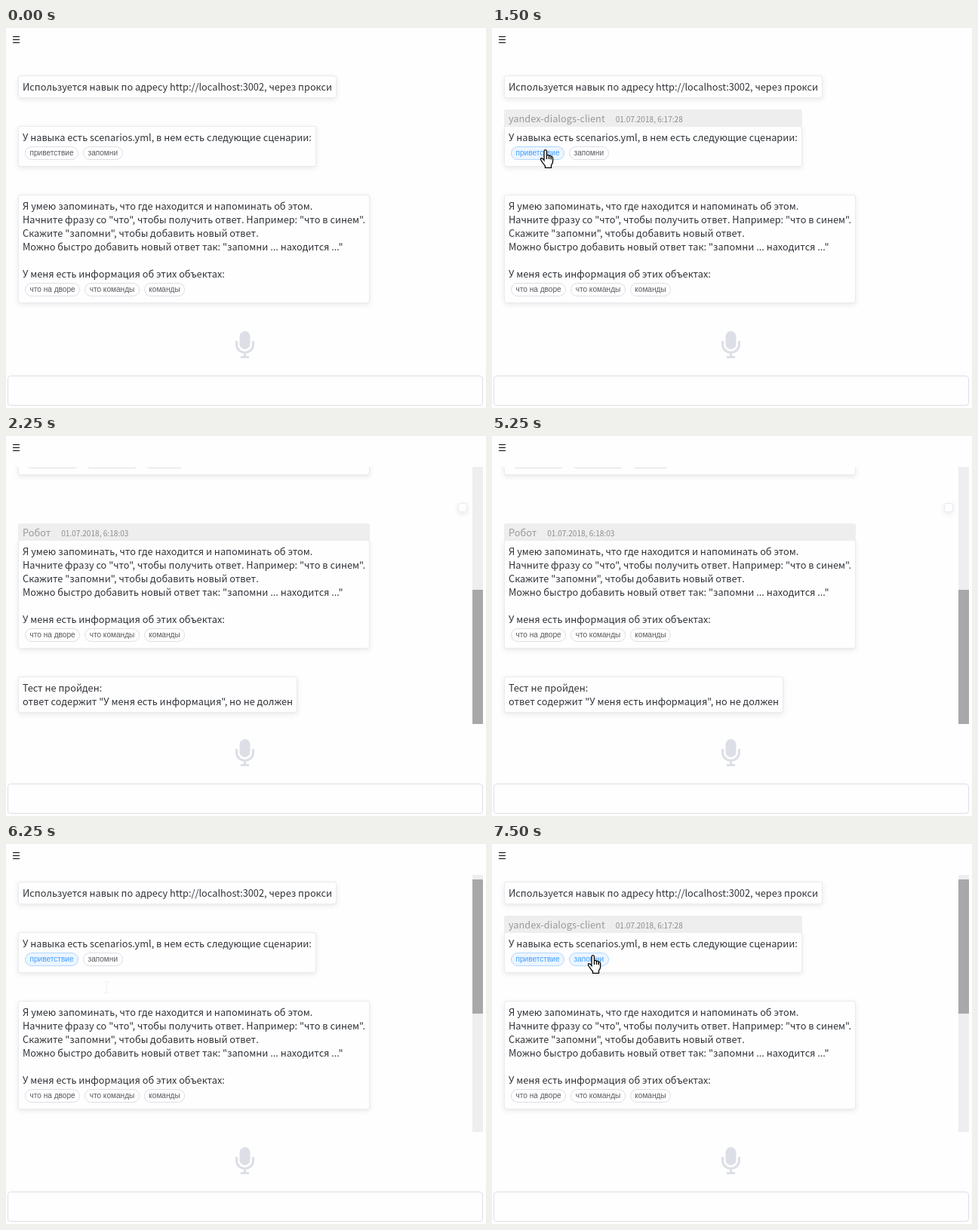
Write an HTML page that moves like this. It is 636 by 504 pixels and loops after 8 s.

```html
<!DOCTYPE html>
<html lang="ru">
<head>
<meta charset="utf-8">
<style>
html, body { margin: 0; width: 100%; height: 100%; overflow: hidden; background: #fefefe; }
body { position: relative; font: 12.75px/18px "Noto Sans CJK JP", "Noto Sans CJK SC", "Noto Sans", sans-serif; color: #2f3338; }
* { box-sizing: border-box; }
[hidden] { display: none !important; }
#view { position: absolute; left: 0; top: 41px; width: 636px; height: 341px; overflow: hidden; }
#list { position: absolute; left: 0; top: -41px; width: 100%; }
.msg { position: absolute; left: 16px; padding: 5px; background: #fefefe; border: 1px solid #e8ebf1; border-radius: 3px; box-shadow: 0 2px 7px rgba(0,0,0,.09); }
.msg.own { left: auto; right: 25px; }
.line { height: 18px; white-space: pre; }
.head { position: absolute; left: -1px; right: -1px; top: -23px; height: 23px; padding: 3px 6px; display: flex; gap: 14px; background: #eee; color: #999; border-radius: 3px 3px 0 0; white-space: nowrap; }
.date { font-size: 10.1px; line-height: 20px; color: #8c8c8c; }
.tags { display: flex; gap: 6px; height: 24px; padding: 3px; }
.tag { height: 18px; padding: 0 5.5px; border: 1px solid #dcdfe6; border-radius: 9px; color: #585a5e; font: 10.1px/16px "Liberation Sans", Arial, sans-serif; white-space: nowrap; }
.tag.on { color: #409eff; background: #ecf5ff; border-color: #b3d8ff; }
#track { position: absolute; left: 618px; top: 0; width: 14px; height: 341px; background: #eee; }
#thumb { position: absolute; left: 0; width: 14px; background: #a8a8a8; }
#menu { position: absolute; left: 9px; top: 11px; }
#mic { position: absolute; left: 303px; top: 401px; }
#input { position: absolute; left: 2px; top: 461px; width: 630px; height: 40px; border: 1px solid #dcdfe6; border-radius: 4px; background: #fefefe; }
.cur { position: absolute; left: 0; top: 0; overflow: visible; }
</style>
</head>
<body>
<svg id="menu" width="9" height="9" fill="#000"><path d="M0 0h9v1H0zM0 4h9v1H0zM0 8h9v1H0z"/></svg>
<div id="view"><div id="list"></div><div id="track"><div id="thumb"></div></div></div>
<svg id="mic" width="27" height="38" fill="none" stroke="#dcdfe6">
  <rect x="6.5" y="1" width="14" height="24" rx="7" fill="#dcdfe6" stroke="none"/>
  <path d="M2.5 14v5a11 10.5 0 0 0 22 0v-5M13.5 29v6M8 35.500h11" stroke-width="3"/>
</svg>
<div id="input"></div>
<svg class="cur" id="arrow" width="13" height="20"><path d="M.5 .5V16.5L4.3 13 7 19 9.5 18 6.8 12H12Z" fill="#fff" stroke="#000"/></svg>
<svg class="cur" id="hand" width="18" height="26" fill="#fff" stroke="#000" stroke-width="1.3">
  <path d="M5 2.5Q5 .6 6.7 .6T8.5 2.5V8.5Q8.6 7.3 10 7.4T11.5 9Q11.7 8 13 8.2T14.3 10Q14.8 9.2 15.7 9.5T16.6 11.5V16.5Q16.5 18 14.5 21V24.4H6.5V22Q3 18 1 14.5Q-.2 12.3 1.2 11.7T5 14.5Z"/>
  <path d="M8.5 8v5M11.5 9v4M14.3 10v3.5" fill="none"/>
</svg>
<svg class="cur" id="beam" width="7" height="16"><path d="M0 .5H3M4 .5H7M3.5 1V15M0 15.5H3M4 15.5H7" stroke="#000" stroke-opacity=".05"/></svg>
<script>
const $ = id => document.getElementById(id);
const LOOP = 8000, TOP = 41, VIEW = 341;
const FIRST = 63, GAP = 37, END = 15, LINE = 18, TAGS = 24, PAD = 12;

const help = {
  lines: [
    'Я умею запоминать, что где находится и напоминать об этом.',
    'Начните фразу со "что", чтобы получить ответ. Например: "что в синем".',
    'Скажите "запомни", чтобы добавить новый ответ.',
    'Можно быстро добавить новый ответ так: "запомни ... находится ..."',
    '',
    'У меня есть информация об этих объектах:'
  ],
  tags: ['что на дворе', 'что команды', 'команды'],
  name: 'Робот'
};

const messages = [
  { lines: ['Используется навык по адресу http://localhost:3002, через прокси'] },
  { lines: ['У навыка есть scenarios.yml, в нем есть следующие сценарии:'],
    tags: ['приветствие', 'запомни'], name: 'yandex-dialogs-client', date: '01.07.2018, 6:17:28' },
  { ...help, date: '01.07.2018, 6:17:28' },
  { lines: [], own: true },
  { ...help, date: '01.07.2018, 6:18:03' },
  { lines: ['Тест не пройден:', 'ответ содержит "У меня есть информация", но не должен'] }
];

const at = (cursor, x, y) => ({ cursor, x, y });

// Each cue changes only the listed parts of the state.
const cues = [
  [0, { count: 3, scroll: 0, hover: -1, active: 0, ...at('', 0, 0) }],
  [250, at('arrow', 248, 374)],
  [500, { hover: 2, ...at('beam', 166, 247) }],
  [750, at('beam', 115, 197)],
  [1000, { hover: 1, ...at('arrow', 100, 171) }],
  [1250, at('hand', 64, 161)],
  [1500, { active: 1 }],
  [1750, { count: 5, scroll: Infinity, hover: -1, ...at('arrow', 70, 161) }],
  [2000, { count: 6 }],
  [2250, { hover: 4, ...at('beam', 67, 160) }],
  [5500, at('beam', 134, 192)],
  [6000, { scroll: 126, ...at('beam', 130, 182) }],
  [6250, { scroll: 13 }],
  [6500, { hover: 2, ...at('beam', 182, 271) }],
  [6750, at('beam', 132, 224)],
  [7000, { hover: -1, ...at('arrow', 126, 169) }],
  [7250, { hover: 1, active: 2, ...at('hand', 127, 147) }]
];

function add(parent, cls, text = '') {
  const el = document.createElement('div');
  el.className = cls;
  el.textContent = text;
  return parent.appendChild(el);
}

let y = FIRST;
for (const m of messages) {
  m.el = add($('list'), m.own ? 'msg own' : 'msg');
  m.el.style.top = y + 'px';
  m.lines.forEach(s => add(m.el, 'line', s));
  if (m.tags) {
    const row = add(m.el, 'tags');
    m.tagEls = m.tags.map(s => add(row, 'tag', s));
  }
  if (m.name) {
    m.head = add(m.el, 'head');
    add(m.head, '', m.name);
    add(m.head, 'date', m.date);
  }
  m.bottom = y + PAD + LINE * m.lines.length + (m.tags ? TAGS : 0);
  y = m.bottom + GAP;
}

function render(t) {
  const s = Object.assign({}, ...cues.filter(c => c[0] <= t).map(c => c[1]));
  messages.forEach((m, i) => {
    m.el.hidden = i >= s.count;
    if (m.head) m.head.hidden = i !== s.hover;
  });
  messages[1].tagEls.forEach((el, i) => el.classList.toggle('on', i < s.active));

  const total = messages[s.count - 1].bottom + END - TOP;
  const scroll = Math.min(s.scroll, Math.max(0, total - VIEW));
  $('list').style.transform = `translateY(${-scroll}px)`;
  $('track').hidden = total <= VIEW;
  $('thumb').style.top = Math.floor(scroll * VIEW / total) + 'px';
  $('thumb').style.height = Math.round(VIEW * VIEW / total) + 'px';

  for (const id of ['arrow', 'hand', 'beam']) {
    $(id).style.display = id === s.cursor ? 'block' : 'none';
    $(id).style.transform = `translate(${s.x}px, ${s.y}px)`;
  }
}

const start = performance.now();
function tick() {
  render((performance.now() - start) % LOOP);
  requestAnimationFrame(tick);
}
tick();
</script>
</body>
</html>
```
